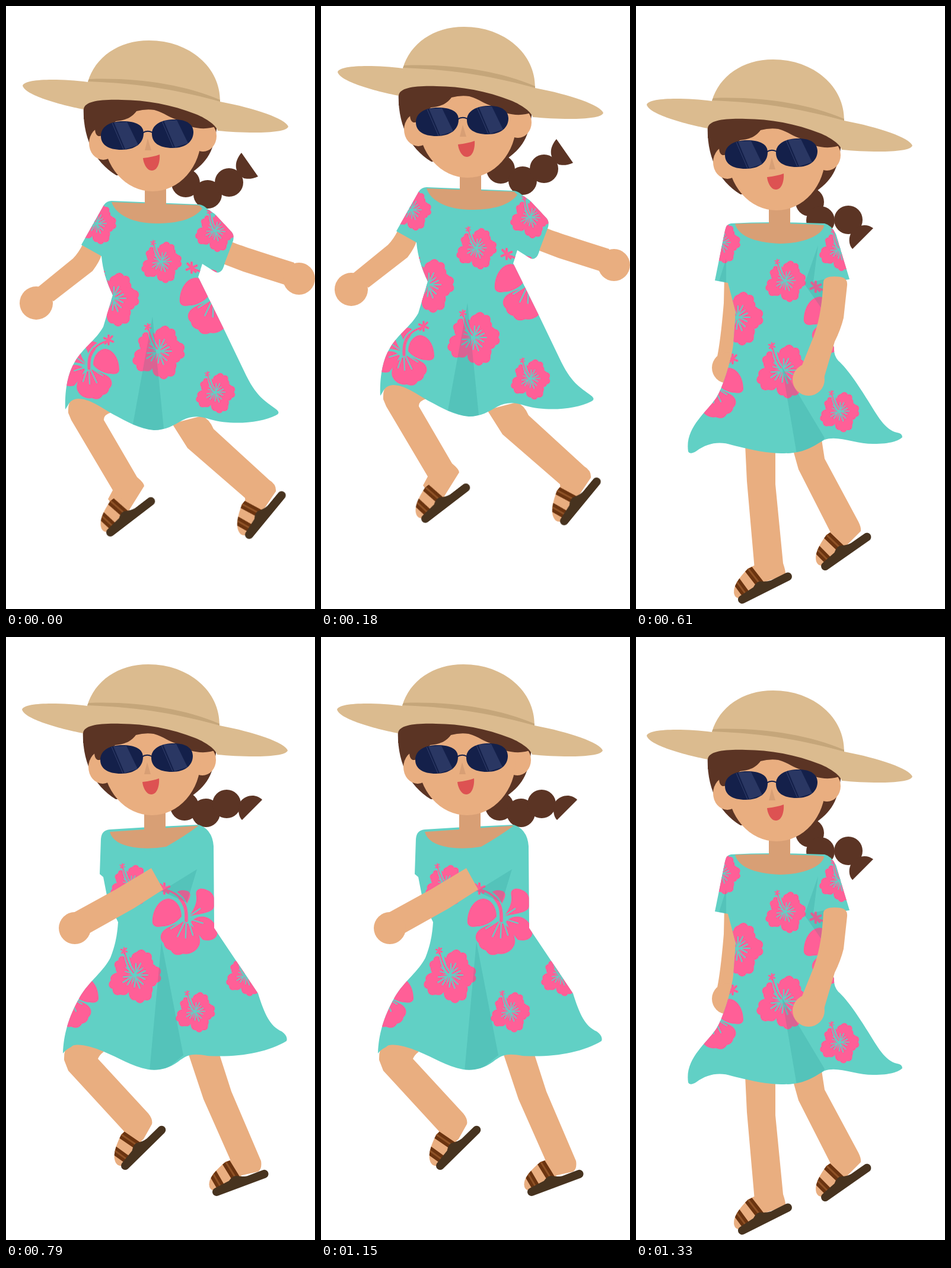
Write an HTML page without scripts that moves like this. It is 521 px wide and 1015 px high and loops after 1.51 s.

```html
<!DOCTYPE html>
<html lang="en">
<head>
<meta charset="utf-8">
<title>Walking in the sun</title>
<style>
  html, body { margin: 0; width: 100%; height: 100%; overflow: hidden; background: #fff; }
  svg { display: block; width: 100vw; height: 100vh; }
  .skin { fill: #e9ae80; }
  .tan { fill: #d89f75; }
  .hair { fill: #5b3424; }
  .teal { fill: #61d0c5; }
  .pink { fill: #ff5f97; }
  .fold { fill: #0a7878; opacity: .15; }
  .vein, .tip { fill: none; stroke-linecap: round; stroke-linejoin: round; }
  .vein { stroke: #61d0c5; }
  .tip { stroke: #ff5f97; }

  /* 1510 ms: stride, hop, stride, pass, cross, hop, cross, pass */
  .pose, #head { animation: 1510ms step-end infinite; }
  #stride { animation-name: stride; }
  #pass { animation-name: pass; }
  #cross { animation-name: cross; }
  #head { animation-name: head; }
  @keyframes stride {
    0%, 28.477% { visibility: visible; transform: none; }
    11.921% { visibility: visible; transform: translateY(-23px); }
    40.397%, 100% { visibility: hidden; transform: none; }
  }
  @keyframes pass {
    0%, 52.318% { visibility: hidden; }
    40.397%, 88.079%, 100% { visibility: visible; }
  }
  @keyframes cross {
    0%, 88.079%, 100% { visibility: hidden; transform: none; }
    52.318%, 76.159% { visibility: visible; transform: none; }
    64.238% { visibility: visible; transform: translateY(-22px); }
  }
  @keyframes head {
    0%, 28.477% { transform: none; }
    11.921% { transform: translateY(-23px); }
    40.397%, 88.079%, 100% { transform: translate(-10px, 32px); }
    52.318%, 76.159% { transform: translate(-1px, -12px); }
    64.238% { transform: translate(-1px, -34px); }
  }
</style>
</head>
<body>
<svg viewBox="0 0 521 1015" preserveAspectRatio="none">
<defs>
  <g id="petal">
    <path class="pink" d="M0,0C-4,-11 -18,-15 -19,-26C-20,-33 -14,-35 -14,-38C-11,-46 -4,-45 0,-42C5,-47 12,-44 13,-37C20,-36 21,-27 18,-21C14,-13 4,-10 0,0Z"/>
    <path class="vein" stroke-width="2" d="M0,-3V-22M0,-4L-7,-18M0,-4L7,-17"/>
  </g>
  <path id="star" class="tip" stroke-width="2.5" d="M0,-5V5M-5,-2L5,2M-4,4L4,-4"/>
  <g id="hibiscus">
    <use href="#petal" transform="rotate(27)"/>
    <use href="#petal" transform="rotate(90)"/>
    <use href="#petal" transform="rotate(159) scale(1.08)"/>
    <use href="#petal" transform="rotate(238) scale(1.05)"/>
    <use href="#petal" transform="rotate(312) scale(.88)"/>
    <path class="vein" stroke-width="8" d="M0,0Q-11,-12 -14,-34"/>
    <path class="tip" stroke-width="2.500" d="M-2,-4Q-11,-14 -17,-38"/>
    <use href="#star" transform="translate(-18 -41)"/>
  </g>
  <g id="lily">
    <path class="pink" d="M8,-4C8,-18 16,-30 28,-31C42,-30 52,-14 52,4C52,10 46,13 38,11C26,11 14,4 8,-4Z
      M4,3C18,8 30,12 35,17C42,24 40,32 35,36C34,44 28,46 24,47C20,55 12,55 6,52C-4,54 -14,48 -17,42C-22,36 -20,24 -13,14Z
      M-6,4C-12,16 -18,24 -24,31C-34,34 -46,30 -46,20C-46,8 -36,-3 -24,-4C-16,-4 -10,-1 -6,4Z
      M-3,-4C-10,-14 -16,-24 -14,-36C-12,-46 -22,-48 -30,-44C-42,-40 -44,-26 -40,-16C-34,-8 -16,-8 -3,-4Z
      M1,-18C0,-28 -10,-36 -2,-42C8,-46 18,-42 15,-36C8,-32 4,-26 1,-18Z"/>
    <path class="vein" stroke-width="2" d="M5,2L24,14M4,5L14,26M1,6L2,28M-3,5L-9,24M-5,0L-24,6M-4,-5L-20,-16"/>
    <path class="vein" stroke-width="11" d="M1,0C0,-18 8,-34 26,-40"/>
    <path class="tip" stroke-width="5" d="M1,2C0,-16 4,-24 10,-31"/>
    <path class="tip" stroke-width="3" d="M4,-22C10,-34 18,-40 31,-44"/>
    <use href="#star" transform="translate(34 -46) scale(1.5)"/>
  </g>
  <path id="sole" d="M50,-42L32,-42Q5,-33 -4,-22Q-13,-10 -3,-3L48,-5Z"/>
  <clipPath id="soleClip"><use href="#sole"/></clipPath>
  <g id="foot">
    <use href="#sole" class="skin"/>
    <g clip-path="url(#soleClip)">
      <path stroke="#6b3410" stroke-width="14" d="M31,-48L39,-8M4,-38L10,-3"/>
      <path stroke="#8f5226" stroke-width="3" d="M31,-48L39,-8M4,-38L10,-3"/>
    </g>
    <path fill="#47331f" d="M0,-7L26,-10Q36,-17 42,-13Q50,-8 58,-7H86A7,7 0 0 1 86,7H0A7,7 0 0 1 0,-7Z"/>
  </g>
  <g id="print">
    <use href="#hibiscus" transform="translate(262 430) scale(.77)"/>
    <use href="#hibiscus" transform="translate(257 581)"/>
    <use href="#hibiscus" transform="translate(353 650) scale(.75)"/>
    <use href="#hibiscus" transform="translate(180 492)"/>
    <use href="#hibiscus" transform="translate(153 366) scale(.74)"/>
    <use href="#hibiscus" transform="translate(353 378) rotate(6) scale(.75)"/>
    <use href="#lily" transform="translate(139 608)"/>
    <use href="#lily" transform="translate(351 492) scale(-1.12 1.12)"/>
  </g>

  <path id="strideDress" d="M178,328L325,334Q333,335 339,341L352,350L381,381Q385,386 383,395L369,432Q366,446 360,448Q356,450 350,446L331,434L324,456L367,543L405,622C425,662 440,666 457,680Q463,686 455,689C430,702 380,706 345,696C325,689 312,690 298,697C282,706 270,714 249,714C225,712 205,700 180,687C160,675 140,661 122,661C106,662 106,672 100,679C99,650 103,620 116,599C130,575 152,562 164,540L180,487C170,465 163,445 161,421L127,402L165,335Q170,328 178,328Z"/>
  <path id="passDress" d="M160,366Q225,362 318,366Q330,369 337,384L360,460L318,466L325,550L334,575Q333,588 341,597C357,611 376,640 391,664C406,688 420,714 440,718Q449,719 449,726C442,732 430,737 400,737C370,737 340,722 318,730C300,740 285,753 250,753C220,753 200,748 162,739C140,732 120,736 102,749Q91,756 88,750C82,710 118,685 135,660C145,645 160,600 164,570L168,515L155,466L133,462L150,378Q152,367 160,366Z"/>
  <path id="crossDress" d="M175,324L240,320L325,316Q348,324 350,352L351,490L425,600C436,635 445,655 465,664Q476,672 473,680C440,700 390,708 340,705C312,700 305,704 290,715C272,728 255,730 240,728C210,722 190,708 165,698C140,687 115,683 110,690Q100,695 96,701C97,670 105,640 125,605C140,580 165,562 176,540C186,515 188,495 189,480L172,445L164,404L158,399L160,340Q161,325 175,324Z"/>
  <clipPath id="strideClip"><use href="#strideDress"/></clipPath>
  <clipPath id="passClip"><use href="#passDress"/></clipPath>
  <clipPath id="crossClip"><use href="#crossDress"/></clipPath>
</defs>

<g id="stride" class="pose">
  <g class="hair">
    <circle cx="303" cy="298" r="24"/><circle cx="340" cy="317" r="24"/><circle cx="376" cy="297" r="24"/>
    <path d="M397,247L425,287C415,292 405,291 401,290C384,280 384,262 397,247Z"/>
  </g>
  <g class="skin">
    <path d="M105,685Q103,650 135,650L178,684Q164,688 165,697L221,793Q233,803 233,808L208,848L183,845L172,830L180,815L110,697Z"/>
    <path d="M280,703L330,690Q343,695 350,712L444,798Q456,805 455,817L434,848L405,850L403,828L306,744Z"/>
    <path d="M130,400Q122,416 113,425L54,473L80,497L146,446Q158,430 161,419Z"/>
    <circle cx="51" cy="500" r="28"/>
    <path d="M380,397Q400,405 486,432L482,473L400,447L366,434Z"/>
    <circle cx="494" cy="459" r="27"/>
  </g>
  <use href="#foot" transform="translate(176 886) rotate(-37.5)"/>
  <use href="#foot" transform="translate(410 890) rotate(-50.5)"/>
  <use href="#strideDress" class="teal"/>
  <g clip-path="url(#strideClip)">
    <use href="#print"/>
    <path class="fold" d="M247,523L214,704L249,716L266,712Z"/>
  </g>
  <path class="tan" d="M178,330L326,335.500L331,341C315,362 280,366 253,366C215,366 185,352 178,330Z"/>
</g>

<g id="pass" class="pose">
  <g class="hair">
    <circle cx="293" cy="330" r="24"/><circle cx="311" cy="361" r="24"/><circle cx="358" cy="360" r="24"/>
    <path d="M400,374L365,409C358,402 358,388 364,380C374,367 390,366 400,374Z"/>
  </g>
  <g class="skin">
    <path d="M184,738L187,800L200,948L200,975L252,958Q253,953 248,938L235,805V748Z"/>
    <path d="M265,748L274,780L328,886L335,912L355,908L379,884Q380,878 375,868L318,762L313,730L290,740Z"/>
    <path d="M149,455L148,500Q143,560 137,590L160,620L175,460Z"/>
    <circle cx="154" cy="609" r="26"/>
  </g>
  <use href="#foot" transform="translate(179 999) rotate(-26.6)"/>
  <use href="#foot" transform="translate(319 943) rotate(-35)"/>
  <use href="#passDress" class="teal"/>
  <g clip-path="url(#passClip)">
    <use href="#print" transform="translate(-10 32)"/>
    <path class="fold" d="M246,607L271,754H300L318,727ZM307,403L284,468L312,508L318,460L299,464ZM152,425L140,463L152,468Z"/>
  </g>
  <path class="tan" d="M167,366.500Q240,364 317,369C317,380 295,399 243,400C195,398 172,385 167,366.500Z"/>
  <g class="skin">
    <path d="M316,464Q318,453 345,456Q357,458 356,470L350,525Q345,545 335,565L317,626L277,612L300,555Q313,520 316,464Z"/>
    <circle cx="291" cy="629" r="27"/>
  </g>
</g>

<g id="cross" class="pose">
  <g class="hair">
    <circle cx="301" cy="285" r="24"/><circle cx="337" cy="296" r="24"/><circle cx="372" cy="281" r="24"/>
    <path d="M432,274L398,308C391,302 390,285 396,276C406,265 422,264 432,274Z"/>
  </g>
  <g class="skin">
    <path d="M98,712Q97,676 125,676L165,698Q158,703 155,710L240,802Q248,812 246,820L232,845Q225,853 210,850L195,850L199,832L105,730Z"/>
    <path d="M307,700L333,778L380,884V910L425,900Q432,895 430,882L380,765L360,703Z"/>
  </g>
  <use href="#foot" transform="translate(201 890) rotate(-44.5)"/>
  <use href="#foot" transform="translate(355 934) rotate(-20.5)"/>
  <use href="#crossDress" class="teal"/>
  <g clip-path="url(#crossClip)">
    <use href="#hibiscus" transform="translate(210 417) scale(.77)"/>
    <use href="#hibiscus" transform="translate(217 569)"/>
    <use href="#hibiscus" transform="translate(319 630) scale(.75)"/>
    <use href="#hibiscus" transform="translate(404 569) scale(.75)"/>
    <use href="#lily" transform="translate(104 604)"/>
    <use href="#lily" transform="translate(305 475) scale(-1.12 1.12)"/>
    <path class="fold" d="M262,513L242,731L272,726L299,704ZM322,391L262,428L305,447Z"/>
  </g>
  <path class="tan" d="M175,328L325,317.500Q300,336 270,353Q240,358 215,354Q180,348 175,328Z"/>
  <g class="skin">
    <path d="M245,389L265,425L215,457L138,500L112,465L185,425Z"/>
    <circle cx="116" cy="490" r="27"/>
  </g>
</g>

<g id="head">
  <path class="tan" d="M234,295H270V345H234Z"/>
  <path class="hair" d="M131,165C128,220 148,262 186,285L308,284C340,262 352,246 357,190V165Z"/>
  <g class="skin">
    <ellipse cx="164" cy="231" rx="24" ry="28"/>
    <ellipse cx="332" cy="219" rx="23" ry="26"/>
    <ellipse cx="247" cy="220" rx="82" ry="92"/>
  </g>
  <path class="hair" d="M131,150V190L150,206C150,218 156,222 163,217L185,194C205,192 213,186 220,177Q235,173 250,175C268,180 275,188 290,192C310,208 340,209 355,202L357,150Z"/>
  <path fill="#14204a" d="M160,219C160,203 175,194 197,194C220,194 232,201 232,214C232,231 218,242 195,242C172,242 160,233 160,219ZM246,215C246,202 258,192 281,191C304,190 316,199 316,212C316,228 303,239 281,239C258,239 246,230 246,215Z"/>
  <path fill="none" stroke="#14204a" stroke-width="2" d="M230,214Q238,208 247,213"/>
  <g id="glint">
    <path fill="#2a3763" d="M182,196L204,195L223,234L201,241Z"/>
    <path stroke="#34416d" d="M179,197L198,241"/>
  </g>
  <use href="#glint" x="84" y="-3"/>
  <path class="tan" d="M239,223L234,243H245Z"/>
  <path fill="#dd5252" d="M231,256Q248,254 259,250C260,262 256,277 246,277C238,277 232,266 231,256Z"/>
  <path fill="#dbbb8f" d="M138,128C150,86 190,58 241,58C310,58 362,104 361,161C420,172 472,190 476,203C472,216 400,214 357,210C355,202 340,190 320,182C280,166 235,158 195,158C160,157 132,160 131,174C90,166 32,150 28,134C32,122 90,122 138,128Z"/>
  <path fill="#c5a67a" d="M140,123C220,120 300,132 361,158V161C300,144 230,130 138,127Z"/>
</g>
</svg>
</body>
</html>
```
